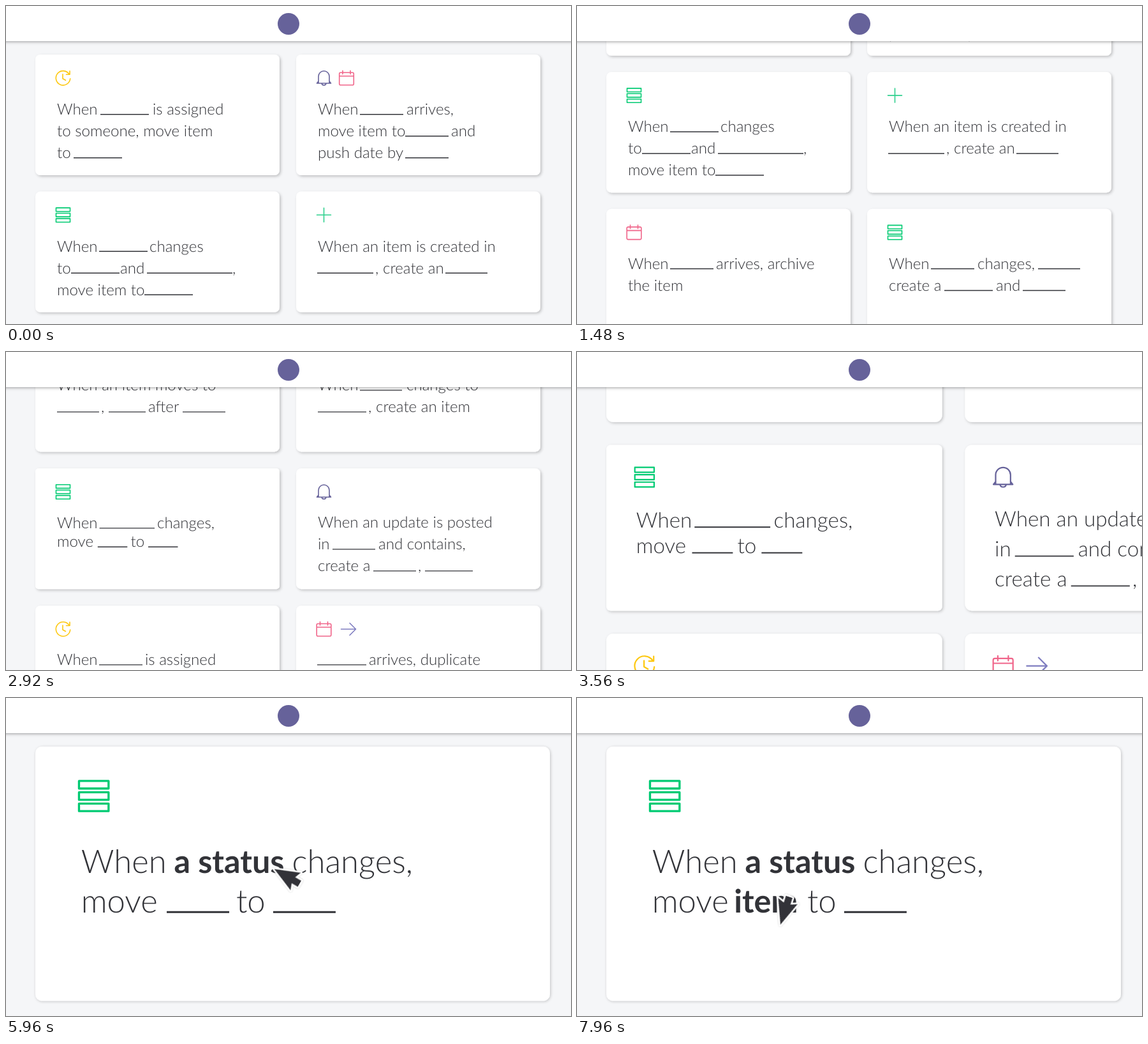
These frames come from a looping animation (886x498 px, 8 s). An HTML page:

```html
<!DOCTYPE html>
<html lang="en">
<head>
<meta charset="utf-8">
<title>Automation recipes</title>
<style>
  html, body { margin: 0; width: 100%; height: 100%; overflow: hidden; background: #f5f6f8; }
  svg { display: block; width: 100%; height: 100%; }
  text { font: 300 24.15px Lato, sans-serif; fill: #323338; text-rendering: geometricPrecision; white-space: pre; }
  .word { font-weight: 700; font-size: 23.9px; }
  .blank { stroke: #323338; stroke-width: 1.4; }
  .icon { fill: none; stroke-width: 1.6; stroke-linecap: round; stroke-linejoin: round; }
</style>
</head>
<body>
<svg id="stage" viewBox="0 0 886 498">
  <defs>
    <filter id="lift" x="-10%" y="-10%" width="120%" height="125%">
      <feDropShadow id="shade" dx="2" dy="2" stdDeviation="2" flood-color="#000" flood-opacity=".22"/>
    </filter>
    <filter id="under" x="-5%" y="-20%" width="110%" height="160%">
      <feDropShadow dx="0" dy="1.5" stdDeviation="2.2" flood-color="#000" flood-opacity=".32"/>
    </filter>
    <filter id="soft" x="-30%" y="-30%" width="160%" height="160%">
      <feDropShadow dx="0" dy="0" stdDeviation="1" flood-color="#000" flood-opacity=".3"/>
    </filter>
  </defs>
  <rect width="886" height="498" fill="#f5f6f8"/>
  <g id="board"></g>
  <rect x="-10" y="-10" width="906" height="65" fill="#fff" filter="url(#under)"/>
  <circle cx="443" cy="28" r="17" fill="#66629a"/>
  <g id="pointer" filter="url(#soft)">
    <path d="M0 0L-39 -16L-35 -5.5L-46 -5.5L-46 5.5L-35 5.5L-39 16Z" fill="#323338"
      stroke="#fff" stroke-width="5" stroke-linejoin="round" paint-order="stroke"/>
  </g>
</svg>
<script>
const LOOP = 8000, COLS = [46, 455], LINE = 34;
const ROWS = [76, 290.5, 505, 720, 938, 1153, 1368];
const FOCUS = 10, FOCUS_TOP = ROWS[5], SCROLL = 972, ZOOM = 2.107;

const ICONS = {
  clock: ['#fdc810', 'M9.5 -6A11.2 11.2 0 1 0 11.2 1M10.5 -11V-5.5H5M-.5 -6V1L4 3.5'],
  bell: ['#66629a', 'M-11 8.2H11M-8.5 8V-2.5A8.5 8.5 0 0 1 8.5 -2.5V8M-8.5 5L-11 8.2M8.5 5L11 8.2M-3.5 8.5A3.6 3.6 0 0 0 3.5 8.5'],
  date: ['#f0658a', 'M-9.5 -8.5H9.5Q11.3 -8.5 11.3 -6.5V9Q11.3 11 9.5 11H-9.5Q-11.3 11 -11.3 9V-6.5Q-11.3 -8.5 -9.5 -8.5ZM-11.3 -3H11.3M-6 -11.5V-6M6 -11.5V-6'],
  list: ['#00ca72', [-8.4, 0, 8.4].map(y => `M-11 ${y - 2.8}h22v5.6h-22Z`).join('')],
  plus: ['#2fd08e', 'M-11 0H11M0 -11V11'],
  arrow: ['#7f7dc0', 'M-8.5 0H14.5M5 -9.5L14.5 0L5 9.5']
};

// Each line is "x text" or "start-end" for a blank, parted by bars.
const CARDS = [
  ['clock', '34 When|102-178|184 is assigned', '34 to someone, move item', '34 to|60-136'],
  ['bell date', '34 When|100-168|173 arrives,', '34 move item to|171-239|243 and', '34 push date by|171-239'],
  ['list', '34 When|100-176|179 changes', '34 to|56-132|133 and|175-309|309 ,', '34 move item to|171-247'],
  ['plus', '34 When an item is created in', '33-121|124 ,|136 create an|234-300'],
  ['date', '34 When|100-168|172 arrives, archive', '34 the item'],
  ['list', '34 When|100-168|173 changes,|268-334', '34 create a|121-197|202 and|244-311'],
  ['clock', '34 Every|97-173|178 ,|191 create a', '34 new|82-158'],
  ['date', '35-111|116 arrives, archive', '34 the item'],
  ['bell arrow', '34 When an item moves to', '34-100|103 ,|115-173|177 after|231-298'],
  ['list', '34 When|100-166|173 changes to', '34-110|113 ,|125 create an item'],
  ['list', '34 When|100.6-187|191 changes,', '34 move|97.8-144.3|149.5 to|177-223.5'],
  ['bell', '34 When an update is posted', '34 in|57-124|129 and contains,', '34 create a|121-188|191 ,|202-277'],
  ['clock', '34 When|100-168|172 is assigned'],
  ['date arrow', '33-110|114 arrives, duplicate']
];

const $ = id => document.getElementById(id);
const board = $('board'), pointer = $('pointer'), shade = $('shade');

function add(parent, tag, attrs, text) {
  const el = document.createElementNS('http://www.w3.org/2000/svg', tag);
  for (const k in attrs) el.setAttribute(k, attrs[k]);
  if (text) el.textContent = text;
  parent.appendChild(el);
  return el;
}

function addLine(card, line, y) {
  for (const part of line.split('|')) {
    const span = part.match(/^([\d.]+)-([\d.]+)$/);
    if (span) {
      add(card, 'line', { class: 'blank', x1: span[1], x2: span[2], y1: y - .3, y2: y - .3 });
    } else {
      const cut = part.indexOf(' ');
      add(card, 'text', { x: part.slice(0, cut), y }, part.slice(cut + 1));
    }
  }
}

const cards = CARDS.map(([icons, ...lines], i) => {
  const row = i >> 1;
  const card = add(board, 'g', { transform: `translate(${COLS[i % 2]} ${ROWS[row]})` });
  add(card, 'rect', { width: 383, height: 189, rx: i === FOCUS ? 5 : 8, fill: '#fff', filter: 'url(#lift)' });
  icons.split(' ').forEach((name, n) => {
    const [stroke, d] = ICONS[name];
    add(card, 'path', { class: 'icon', d, stroke, transform: `translate(${43.5 + n * 35.5} 36.8)` });
  });
  const top = row > 2 && i !== FOCUS ? 93 : 94;
  const gap = i === FOCUS ? 29.3 : LINE;
  lines.forEach((line, n) => addLine(card, line, top + n * gap));
  return card;
});

const blanks = cards[FOCUS].querySelectorAll('.blank');
const words = [[103.2, 94, 'a status'], [95, 123.3, 'item']].map(([x, y, s]) =>
  add(cards[FOCUS], 'text', { class: 'word', x, y }, s));

const span = (t, a, b) => Math.min(1, Math.max(0, (t - a) / (b - a)));
const cubic = (a, b, c, d, u) => {
  const v = 1 - u;
  return v * v * v * a + 3 * v * v * u * b + 3 * v * u * u * c + u * u * u * d;
};

// Ease with flat ends; x1 and x2 are the handle positions.
function ease(p, x1, x2) {
  let lo = 0, hi = 1;
  for (let i = 0; i < 30; i++) {
    const mid = (lo + hi) / 2;
    if (cubic(0, x1, x2, 1, mid) < p) lo = mid; else hi = mid;
  }
  return cubic(0, 0, 1, 1, (lo + hi) / 2);
}

const ENTER = [[725, -10], [735, 370], [590, 368], [421, 268]];
const LEAVE = [[421, 268], [360, 232], [332, 314], [319, 355]];

function pointAt(path, u) {
  const at = k => cubic(...path.map(p => p[k]), u);
  const slope = k => {
    const [a, b, c, d] = path.map(p => p[k]), v = 1 - u;
    return v * v * (b - a) + 2 * u * v * (c - b) + u * u * (d - c);
  };
  const angle = Math.atan2(slope(1), slope(0)) * 180 / Math.PI;
  return `translate(${at(0)} ${at(1)}) rotate(${angle})`;
}

function draw(t) {
  const scroll = SCROLL * ease(span(t, 0, 3000), .866, .552);
  const z = ease(span(t, 3120, 4140), .6, .4);
  const scale = 1 + (ZOOM - 1) * z;
  const y = FOCUS_TOP - scroll + (76 - FOCUS_TOP + SCROLL) * z;
  board.setAttribute('transform',
    `translate(46 ${y}) scale(${scale}) translate(-46 ${-FOCUS_TOP})`);
  shade.setAttribute('dx', (2 - z) / scale);
  shade.setAttribute('dy', (2 - z) / scale);
  shade.setAttribute('stdDeviation', 2 / scale);

  [span(t, 5580, 5780), span(t, 7200, 7400)].forEach((f, i) => {
    blanks[i].setAttribute('opacity', 1 - f);
    words[i].setAttribute('opacity', f);
  });

  pointer.setAttribute('visibility', t < 4740 ? 'hidden' : 'visible');
  pointer.setAttribute('transform', t < 5600
    ? pointAt(ENTER, ease(span(t, 4720, 5420), .4, .3))
    : pointAt(LEAVE, ((t - 5600) / 2360) ** 3.3));
}

const start = performance.now();
function tick() {
  draw((performance.now() - start) % LOOP);
  requestAnimationFrame(tick);
}
draw(0);
requestAnimationFrame(tick);
</script>
</body>
</html>
```
